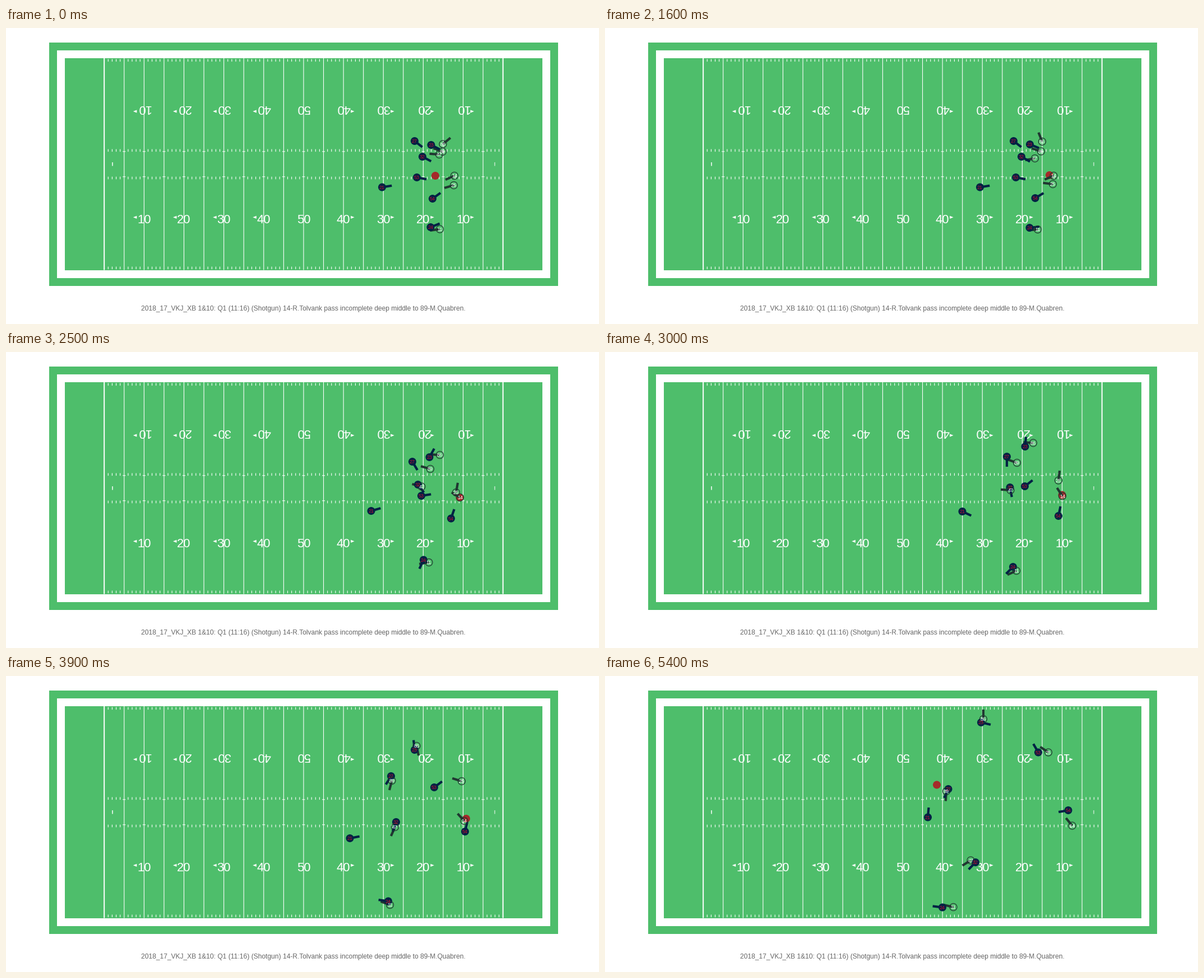
Animation of 1058 by 529 pixels, one loop 5500 ms. Source, as a matplotlib script:

```python
import numpy as np
import matplotlib.pyplot as plt
from matplotlib.animation import FuncAnimation
from matplotlib.patches import Circle, Polygon, Rectangle

W, H, DPI = 1058, 529, 64
PT = 72 / DPI  # points per pixel
FRAMES, INTERVAL = 55, 100
GREEN, NAVY, RED = "#4ebe6b", "#002244", "#c60c30"
DARK, BROWN, GREY = "#203731", "#a52a2a", "#666666"
GOAL, YARD = 175.2, 7.115
KEY_TIMES = np.array([0, 11, 16, 25, 30, 39, 47, 54])
CAPTION = ("2018_17_VKJ_XB 1&10: Q1 (11:16) (Shotgun) 14-R.Tolvank "
           "pass incomplete deep middle to 89-M.Quabren.")

plt.rcParams["font.family"] = "Liberation Sans"
fig = plt.figure(figsize=(W / DPI, H / DPI), dpi=DPI, facecolor="white")
ax = fig.add_axes([0, 0, 1, 1])
ax.set(xlim=(0, W), ylim=(H, 0))
ax.axis("off")


def label(x, y, text, size, color="white", **kw):
    return ax.text(x, y, text, fontsize=size * PT, color=color, ha="center",
                   va="baseline", **kw)


def rect(x0, y0, x1, y1, color):
    ax.add_patch(Rectangle((x0, y0), x1 - x0, y1 - y0, fc=color, lw=0, zorder=0))


def vlines(xs, y0, y1, width=1.1):
    ax.vlines(xs, y0, y1, color="white", lw=width * PT, snap=False, zorder=1)


def yard_x(yard):
    return GOAL + YARD * yard


def arrow(x, y, side):
    ax.add_patch(Polygon([(x + side * 13, y - 2.6), (x + side * 13, y + 2.6),
                          (x + side * 19.5, y)], fc="white", lw=0, zorder=1))


def draw_field():
    rect(77, 26, 985, 461, GREEN)
    rect(91, 40, 971, 447, "white")
    rect(105, 54, 957, 432.5, GREEN)

    fives = yard_x(np.arange(5, 100, 5))
    vlines(fives, 54, 432.5)
    vlines(yard_x(np.array([0, 100])), 54, 432.5, 2)
    ticks = yard_x(np.array([n for n in range(1, 100) if n % 5]))
    for top in (55.5, 216.5, 265.7, 426.5):
        vlines(ticks, top, top + 4.6)
    for y in (220.8, 265.8):
        ax.hlines(np.full(len(fives), y), fives - 2.5, fives + 2.5, color="white",
                  lw=1.1 * PT, snap=False, zorder=1)
    vlines([190], 240, 246.5, 1.5)
    vlines([872], 240, 246.5, 1)

    for yard in range(10, 100, 10):
        x, text = yard_x(yard), str(min(yard, 100 - yard))
        label(x, 349, text, 22)
        label(x, 138, text, 22, rotation=180, rotation_mode="anchor")
        if yard != 50:
            side = -1 if yard < 50 else 1
            arrow(x, 338.3, side)
            arrow(x, 149, side)

    label(530.3, 505, CAPTION, 12, GREY)


def smooth_path(keys):
    """Monotone cubic through the keys, holding the first until the snap."""
    p = np.array([keys[0]] + keys, float)
    h = np.diff(KEY_TIMES)[:, None]
    slope = np.diff(p, axis=0) / h
    product = slope[:-1] * slope[1:]
    total = np.where(product > 0, slope[:-1] + slope[1:], 1)
    inner = np.where(product > 0, 2 * product / total, 0)
    m = np.vstack([slope[:1], inner, slope[-1:]])

    def at(t):
        i = min(np.searchsorted(KEY_TIMES, t, side="right") - 1, len(h) - 1)
        u = (t - KEY_TIMES[i]) / h[i]
        return ((1 + 2 * u) * (1 - u) ** 2 * p[i] + u * (1 - u) ** 2 * h[i] * m[i]
                + u * u * (3 - 2 * u) * p[i + 1] + u * u * (u - 1) * h[i] * m[i + 1])
    return at


class Player:
    """Dot with a jersey number and a bar for the body's direction."""

    def __init__(self, number, offense, *keys):
        self.at = smooth_path(list(keys))
        color = DARK if offense else NAVY
        self.bar, = ax.plot([], [], color=color, lw=4.2 * PT, zorder=3 + (not offense),
                            solid_capstyle="butt")
        look = dict(fc="none", ec=DARK, lw=1.2 * PT) if offense else dict(fc=NAVY, lw=0)
        self.dot = ax.add_patch(Circle((0, 0), 6.5 if offense else 7,
                                       zorder=5 + offense, **look))
        self.text = label(0, 0, str(number), 9, "white" if offense else RED,
                          zorder=7 + offense)

    def update(self, t):
        x, y, degrees = self.at(t)
        a = np.radians(degrees)
        self.bar.set_data([x, x + 17.5 * np.cos(a)], [y, y - 17.5 * np.sin(a)])
        self.dot.center = x, y
        self.text.set_position((x, y + 3.3))


draw_field()

# Keys are (x, y, facing in degrees).
players = [
    Player(27, False, (729, 202, -38), (729, 202, -38), (725, 196, -59),
           (717, 187, -90), (687, 179, -122), (647, 189, -104), (612.5, 202, -115)),
    Player(23, False, (758.5, 209, -27), (758, 208, -22), (755.5, 188, 61),
           (749.5, 169, 85), (729, 132, 96), (697, 104, 73), (671, 83, -13)),
    Player(32, False, (743, 230, -28), (743, 230, -30), (735, 237, -53),
           (722.5, 242, -79), (696, 261, -110), (678, 298, -103), (661, 333, -134)),
    Player(53, False, (733, 267, -11), (733, 267, -11), (741, 257, 9),
           (749, 240, 38), (764, 199, 37), (774.5, 162, 78), (773, 136.5, 120)),
    Player(21, False, (671, 284.5, 9), (669, 284.5, 9), (651.5, 284, 16),
           (637.5, 285, -25), (613.5, 290, 11), (592.5, 278.5, 79), (576, 252.5, 85)),
    Player(54, False, (761, 305, 36), (767.5, 304, 31), (794, 297.5, 71),
           (809, 293, 78), (819, 278, 77), (825.5, 258, 92), (826.5, 240, 190)),
    Player(24, False, (757.5, 356, 22), (757.5, 357, 6), (745, 371.5, -115),
           (728, 384, -135), (682, 402.5, -188), (635.5, 411, -205), (602, 413.5, -187)),
    Player(86, True, (779.5, 207.5, 40), (780, 203, 112), (774, 184, 177),
           (764, 162.5, 176), (732.5, 125, 282), (699.5, 98, 281), (675, 77, 450)),
    Player(89, True, (779, 221, 160), (778, 220.5, 162), (757, 209, 164),
           (735, 198, 161), (688.5, 187, 255), (644.5, 195, 272), (609, 206, 266)),
    Player(47, True, (773, 226, 176), (767, 233, 190), (741.5, 240.5, 165),
           (723.5, 247, 176), (694, 270, 246), (672, 303, 239), (652.5, 329.5, 212)),
    Player(14, True, (800, 264, 204), (800.5, 264, 203), (810, 260, 149),
           (816, 257.5, 123), (817.5, 259, 132), (823, 262.5, 117), (833.5, 267.5, 129)),
    Player(25, True, (799, 281, 196), (799, 279, 173), (803, 251, 80),
           (809, 229.5, 83), (813, 188, 163), (804.5, 155, 150), (791, 136.5, 146)),
    Player(11, True, (774, 359.5, 188), (772, 360, 185), (754.5, 376, 189),
           (734, 391, 204), (685, 409, 160), (645.5, 414.5, 165), (621.5, 413, 167)),
]

# Snap, carry and throw, each in a straight line.
BALL_T, BALL_X, BALL_Y = zip(
    (0, 766, 264), (11, 766, 264), (16, 793, 263), (18, 801, 262), (25, 809.5, 260),
    (30, 815.5, 255.5), (39, 821, 255), (47, 696.5, 224), (54, 592, 194.5))
ball = ax.add_patch(Circle((0, 0), 7, fc=BROWN, lw=0, zorder=2))


def update(frame):
    for player in players:
        player.update(frame)
    ball.center = np.interp(frame, BALL_T, BALL_X), np.interp(frame, BALL_T, BALL_Y)
    return []


anim = FuncAnimation(fig, update, frames=FRAMES, interval=INTERVAL,
                     init_func=lambda: update(0), repeat=True, repeat_delay=0)
plt.show()
```
